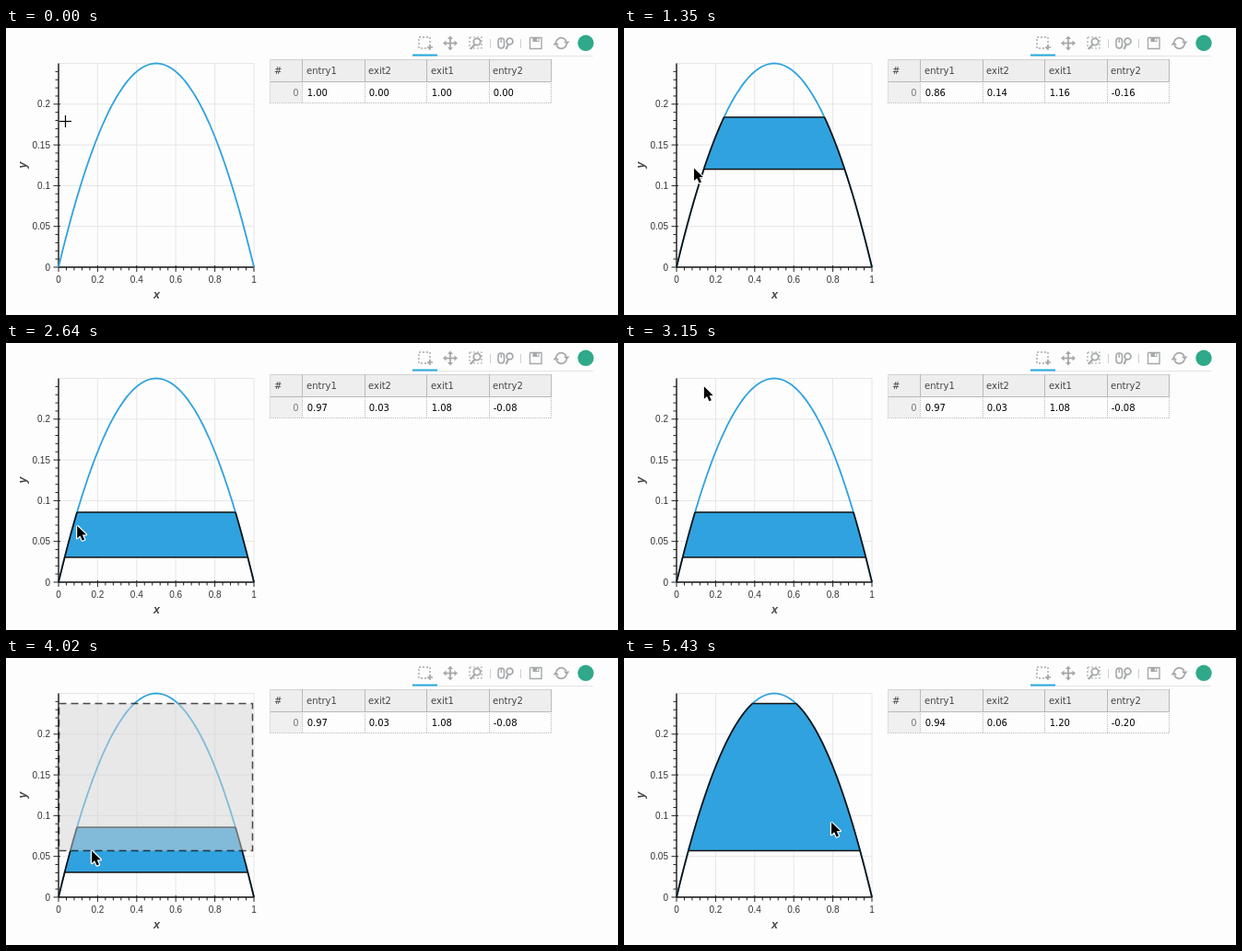
An HTML page with a canvas for the animation above (5460 ms loop, 664 by 312 pixels).

```html
<!DOCTYPE html>
<html lang="en">
<head>
<meta charset="utf-8">
<title>Parabola selection</title>
<style>
html, body { margin: 0; width: 100%; height: 100%; overflow: hidden; background: #fdfdfd; }
canvas, svg { position: absolute; left: 0; top: 0; width: 664px; height: 312px; }
.axis { font: 10px "Liberation Sans", Arial, sans-serif; fill: #333; }
.label { font: italic bold 12.5px "Liberation Sans", Arial, sans-serif; fill: #444; }
.table { font: 10px "DejaVu Sans", Verdana, sans-serif; fill: #000; }
.head { fill: #444; }
.index { fill: #7c7c7c; }
</style>
</head>
<body>
<canvas id="stage"></canvas>
<svg id="text" viewBox="0 0 664 312"></svg>
<script>
const LOOP = 5460;
const PAPER = '#fdfdfd', BLUE = '#30a2df', GRID = '#e6e6e6', ICON = '#a5a8aa';
const X0 = 57, Y0 = 260, XS = 212, YS = 886;
const px = x => X0 + x * XS;
const py = y => Y0 - y * YS;
const toY = p => (Y0 - p) / YS;

// Pointer stops: time, x, y
const path = [
  [0, 64, 101], [170, 64, 97], [1020, 76, 153.6], [1300, 76, 152.5],
  [1400, 76, 152.5], [1780, 75.5, 184], [2490, 76, 233], [2570, 76, 233],
  [2860, 84, 5], [3120, 86, 47], [3250, 92, 49.5], [4000, 93, 209.6],
  [4640, 93, 209.6], [5400, 225, 178.5], [5460, 225, 178.5]
];
// Each drag selects the band between its top and bottom
const drags = [
  { from: 170, to: 1080, top: 97, bottom: 153.6 },
  { from: 1780, to: 2530, top: 184, bottom: 233 },
  { from: 3250, to: 4050, top: 49.5, bottom: 209.6 }
];

const canvas = document.getElementById('stage');
const g = canvas.getContext('2d');
const svg = document.getElementById('text');
const dpr = window.devicePixelRatio || 1;
canvas.width = 664 * dpr;
canvas.height = 312 * dpr;

function addText(s, x, y, cls, anchor = 'start') {
  const el = document.createElementNS('http://www.w3.org/2000/svg', 'text');
  el.setAttribute('x', x);
  el.setAttribute('y', y);
  el.setAttribute('class', cls);
  el.setAttribute('text-anchor', anchor);
  el.textContent = s;
  svg.appendChild(el);
  return el;
}

for (let i = 0; i <= 5; i++) {
  addText(String(i * 2 / 10), px(i / 5), 277, 'axis', 'middle');
  if (i < 5) addText(String(i * 5 / 100), 48, py(i * 0.05) + 3.5, 'axis', 'end');
}
addText('x', 163.5, 294, 'label', 'middle');
addText('y', 0, 0, 'label', 'middle').setAttribute('transform', 'translate(22 149) rotate(-90)');

const cols = [326, 393, 461, 528];
addText('#', 291, 50, 'table head');
['entry1', 'exit2', 'exit1', 'entry2'].forEach((s, i) => addText(s, cols[i], 50, 'table head'));
addText('0', 317.5, 74, 'table index', 'end');
const cells = cols.map(x => addText('', x + 0.7, 74, 'table'));

function line(points, color, width = 1, dash = []) {
  g.beginPath();
  points.forEach(([x, y], i) => i ? g.lineTo(x, y) : g.moveTo(x, y));
  g.strokeStyle = color;
  g.lineWidth = width;
  g.setLineDash(dash);
  g.stroke();
  g.setLineDash([]);
}

function box(x, y, w, h, color, width, dash = []) {
  line([[x, y], [x + w, y], [x + w, y + h], [x, y + h], [x, y]], color, width, dash);
}

function fill(x, y, w, h, color) {
  g.fillStyle = color;
  g.fillRect(x, y, w, h);
}

function shape(points, color) {
  g.beginPath();
  points.forEach(([x, y]) => g.lineTo(x, y));
  g.closePath();
  g.fillStyle = color;
  g.fill();
}

function ring(x, y, r, width = 1.5, a = 0, b = Math.PI * 2) {
  g.beginPath();
  g.arc(x, y, r, a, b);
  g.strokeStyle = ICON;
  g.lineWidth = width;
  g.stroke();
}

function drawTools() {
  line([[441, 30.5], [637, 30.5]], '#e5e5e5');
  fill(441, 28.5, 27, 2, '#26aae1');

  box(448, 10, 12, 12, ICON, 1.4, [2, 2]);
  line([[457, 21], [463, 21]], ICON, 1.6);
  line([[460, 18], [460, 24]], ICON, 1.6);

  line([[476, 16.5], [488, 16.5]], ICON, 1.8);
  line([[482, 10.5], [482, 22.5]], ICON, 1.8);
  for (let i = 0; i < 4; i++) {
    g.save();
    g.translate(482, 16.5);
    g.rotate(i * Math.PI / 2);
    shape([[-3, -4.5], [0, -8], [3, -4.5]], ICON);
    g.restore();
  }

  box(503, 10, 13, 12, ICON, 1.2, [2, 2]);
  ring(511, 15, 3.7, 1.8);
  line([[508.5, 18], [504, 23]], ICON, 2.2);

  g.beginPath();
  g.roundRect(534, 11, 6.5, 11, 3.2);
  g.strokeStyle = ICON;
  g.lineWidth = 1.6;
  g.stroke();
  line([[537.2, 12], [537.2, 16]], ICON, 1.4);
  ring(546.5, 14.5, 3.4, 1.8);
  line([[545, 17.5], [542.5, 23]], ICON, 2);

  line([[525.5, 12], [525.5, 22]], '#d0d0d0');
  line([[558.5, 12], [558.5, 22]], '#d0d0d0');

  box(568.5, 10.5, 12.5, 12, ICON, 1.4);
  fill(571.5, 11, 7, 4, ICON);
  fill(576, 11.5, 1.5, 2.5, PAPER);

  ring(602.5, 16.5, 5.8, 1.7, Math.PI * 1.08, Math.PI * 1.88);
  ring(602.5, 16.5, 5.8, 1.7, Math.PI * 0.08, Math.PI * 0.88);
  shape([[605, 14.5], [611.5, 14.5], [608.5, 18.5]], ICON);
  shape([[593.5, 18.5], [600, 18.5], [596.5, 14.5]], ICON);

  g.beginPath();
  g.arc(629, 16.3, 8.7, 0, Math.PI * 2);
  g.fillStyle = '#2fa98a';
  g.fill();
}

function drawTable() {
  fill(286, 34, 306, 24, '#eeeeee');
  fill(286, 58, 35, 23, '#f0f0f0');
  const edge = '#b8b8b8', dots = [1, 1];
  line([[286, 34.5], [592, 34.5]], '#d0d0d0');
  line([[286, 58.5], [592, 58.5]], edge);
  line([[286, 81.5], [592, 81.5]], edge, 1, dots);
  line([[286.5, 34], [286.5, 81]], '#dcdcdc');
  for (const x of [321.5, 389.5, 456.5, 524.5, 591.5]) {
    line([[x, 34], [x, 58]], edge);
    line([[x, 58], [x, 82]], edge, 1, dots);
  }
}

function drawAxes() {
  line([[X0, Y0], [px(1), Y0]], '#111', 1.7);
  line([[X0, 38.5], [X0, Y0]], '#222', 1.5);
  for (let i = 0; i <= 25; i++) {
    const x = px(i / 25), y = py(i / 100), major = i % 5 === 0;
    line([[x, Y0 - (major ? 2 : 0)], [x, Y0 + (major ? 5 : 3.5)]], '#222');
    if (i < 25) line([[X0 - (major ? 5.5 : 3.5), y], [X0 + (major ? 2 : 0), y]], '#222');
  }
}

function drawGrid() {
  for (let i = 1; i <= 5; i++) {
    line([[px(i / 5), 38.5], [px(i / 5), Y0]], GRID);
    if (i < 5) line([[X0, py(i / 20)], [px(1), py(i / 20)]], GRID);
  }
  line([[X0, 38.5], [px(1), 38.5]], GRID);
}

function curve(a, b) {
  const points = [];
  for (let i = 0; i <= 80; i++) {
    const x = a + (b - a) * i / 80;
    points.push([px(x), py(x * (1 - x))]);
  }
  return points;
}

const root = y => (1 - Math.sqrt(Math.max(0, 1 - 4 * y))) / 2;

function drawCurve(band) {
  line(curve(0, 1), BLUE, 1.8);
  if (!band) return;
  const lo = root(toY(band.bottom)), hi = root(toY(band.top));
  shape([...curve(lo, hi), ...curve(1 - hi, 1 - lo)], BLUE);
  const ink = '#111';
  line([[px(lo), band.bottom], [px(1 - lo), band.bottom]], ink, 1.5);
  line([[px(hi), band.top], [px(1 - hi), band.top]], ink, 1.5);
  line(curve(0, hi), ink, 1.7);
  line(curve(1 - hi, 1), ink, 1.7);
}

function drawTableValues(band) {
  const lo = band ? toY(band.bottom) : 0, hi = band ? toY(band.top) : 0;
  const exit = (1 + Math.sqrt(1 + 4 * hi)) / 2;
  [1 - root(lo), root(lo), exit, 1 - exit].forEach((v, i) => {
    const s = v.toFixed(2);
    if (cells[i].textContent !== s) cells[i].textContent = s;
  });
}

function pointer(t) {
  let i = 0;
  while (i < path.length - 2 && t >= path[i + 1][0]) i++;
  const [t0, x0, y0] = path[i], [t1, x1, y1] = path[i + 1];
  const u = (t - t0) / (t1 - t0), e = u * u * (3 - 2 * u);
  return [x0 + (x1 - x0) * e, y0 + (y1 - y0) * e];
}

function drawArrow(x, y) {
  const p = [[0, 0], [0, 13.5], [3.2, 10.7], [5.6, 16], [8, 15], [5.7, 9.8], [9.8, 9.6]]
    .map(([a, b]) => [x + a, y + b]);
  g.lineJoin = 'round';
  line([...p, p[0]], '#fff', 2.4);
  shape(p, '#000');
  g.lineJoin = 'miter';
}

function drawCross(x, y) {
  line([[x - 6, y + 0.5], [x + 7, y + 0.5]], '#000', 1.2);
  line([[x + 0.5, y - 6], [x + 0.5, y + 7]], '#000', 1.2);
}

function draw(t) {
  const [x, y] = pointer(t);
  const band = drags.filter(d => t >= d.to).pop();
  const drag = drags.find(d => t >= d.from && t < d.to);
  g.setTransform(dpr, 0, 0, dpr, 0, 0);
  fill(0, 0, 664, 312, PAPER);
  drawTools();
  drawTable();
  drawGrid();
  drawAxes();
  drawCurve(band);
  drawTableValues(band);
  if (drag && y > drag.top) {
    fill(57.5, drag.top, 210, y - drag.top, 'rgba(211,211,211,0.5)');
    box(57.5, drag.top, 210, y - drag.top, 'rgba(0,0,0,0.7)', 1.5, [8, 5]);
  }
  if (t < drags[0].from) drawCross(x, y);
  else drawArrow(x, y);
}

const start = performance.now();
function tick() {
  draw((performance.now() - start) % LOOP);
  requestAnimationFrame(tick);
}
tick();
</script>
</body>
</html>
```
